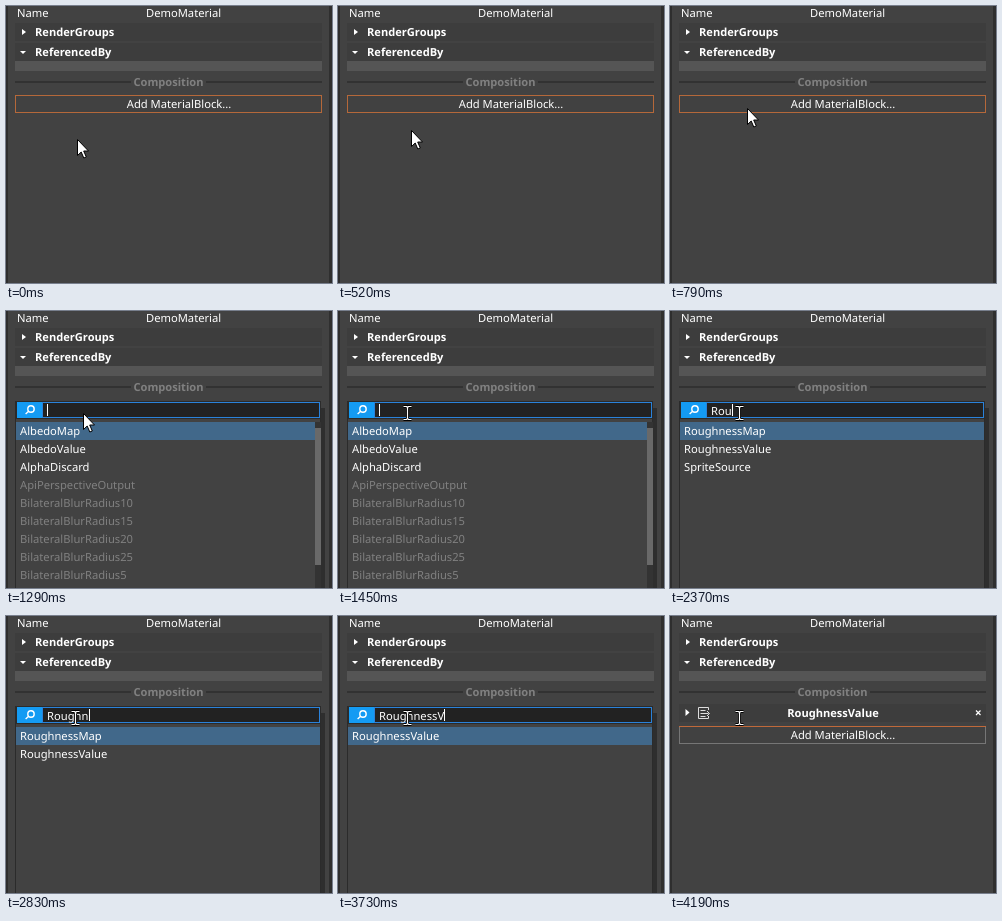
An HTML page for the animation above (5.28 s loop, 326x277 px).

```html
<!DOCTYPE html>
<html lang="en">
<head>
<meta charset="utf-8">
<title>Material block picker</title>
<style>
html, body { margin: 0; width: 100%; height: 100%; overflow: hidden; background: #424242; }
svg { display: block; width: 326px; height: 277px; }
text { font: 11.2px "Noto Sans", "Open Sans", sans-serif; fill: #fff; text-rendering: geometricPrecision; white-space: pre; }
.bold { font-weight: 700; font-size: 11.1px; }
.mid { text-anchor: middle; }
.dim { fill: #808080; }
.head { fill: #3d3d3d; }
.line { fill: #323232; }
</style>
</head>
<body>
<svg viewBox="0 0 326 277">
  <rect width="326" height="277" fill="#424242"/>
  <rect width="2" height="277" fill="#2e2e2e"/>
  <rect x="323" width="3" height="277" fill="#2f2f2f"/>

  <text x="11" y="11">Name</text>
  <text x="140" y="11">DemoMaterial</text>
  <rect class="head" x="9" y="17" width="307" height="18"/>
  <path d="M16 23l4 3-4 3z" fill="#fff"/>
  <text class="bold" x="29" y="30">RenderGroups</text>
  <rect class="head" x="9" y="37" width="307" height="18"/>
  <path d="M14 45h6l-3 3z" fill="#fff"/>
  <text class="bold" x="29" y="50">ReferencedBy</text>
  <rect x="9" y="55" width="307" height="10" fill="#555"/>
  <rect class="line" x="9" y="75" width="116" height="2"/>
  <rect class="line" x="200" y="75" width="116" height="2"/>
  <text class="bold mid dim" x="162.5" y="80">Composition</text>

  <g id="before">
    <rect x="9.5" y="89.5" width="306" height="17" fill="#414141" stroke="#b5683a"/>
    <text class="mid" x="173" y="102">Add MaterialBlock...</text>
  </g>

  <g id="popup">
    <rect x="315" y="97" width="4" height="180" fill="#000" opacity=".3"/>
    <rect x="9" y="90" width="306" height="187" fill="#2b2b2b"/>
    <rect x="10" y="108" width="304" height="169" fill="#424242"/>
    <rect x="36.5" y="91.5" width="277" height="15" fill="#222" stroke="#2a82da"/>
    <rect x="11" y="91" width="25" height="16" fill="#149bf3"/>
    <g fill="none" stroke="#fff" stroke-width="1.4">
      <circle cx="25" cy="98" r="3.2"/>
      <path d="M22.6 100.3L19.6 103"/>
    </g>
    <text id="query" x="41" y="104"></text>
    <rect id="caret" y="93" width="1" height="12" fill="#fff"/>
    <rect id="pick" x="10" y="111" height="18" fill="#41688a"/>
    <g id="rows"></g>
    <g id="bar">
      <rect x="309" y="111" width="6" height="166" fill="#333"/>
      <rect id="thumb" x="309" y="117" width="6" fill="#696969"/>
    </g>
  </g>

  <g id="after">
    <rect class="head" x="9" y="88" width="307" height="18"/>
    <path d="M15.5 93l4 3.5-4 3.5z" fill="#fff"/>
    <g fill="none" stroke="#ddd">
      <path d="M38.5 94V91.500H28.500V102.500H38.500V100"/>
      <path d="M30.500 94.500h5M30.500 97.500h8M30.500 100.500h5M37 95l2.500 2.500-2.500 2.500"/>
    </g>
    <text class="bold mid" x="163" y="101">RoughnessValue</text>
    <path d="M306 94.500l4.500 4.500M310.500 94.500l-4.500 4.500" stroke="#fff" stroke-width="1.200"/>
    <rect x="9.500" y="110.500" width="306" height="17" fill="#414141" stroke="#767676"/>
    <rect x="9" y="110" width="307" height="1" fill="#c0693a"/>
    <text class="mid" x="173" y="123">Add MaterialBlock...</text>
  </g>

  <path id="arrow" d="M.5 .5V16.500L4.200 13 6.800 19 9.300 18 6.700 12H11.500z" fill="#fff" stroke="#000"/>
  <g id="beam" fill="none">
    <path id="stem" d="M-4-6.500H-1L0-5.500 1-6.500H4M0-5.500V5.500M-4 6.500H-1L0 5.500 1 6.500H4" stroke="#000" stroke-width="3"/>
    <use href="#stem" style="display:none"/>
    <path d="M-4-6.500H-1L0-5.500 1-6.500H4M0-5.500V5.500M-4 6.500H-1L0 5.500 1 6.500H4" stroke="#fff" stroke-width="1.200"/>
  </g>
</svg>
<script>
const LOOP = 5280, OPEN = 1290, CLOSE = 4190;
const $ = id => document.getElementById(id);
const show = (id, on) => $(id).setAttribute('visibility', on ? 'inherit' : 'hidden');
const place = (id, x, y) => $(id).setAttribute('transform', `translate(${x} ${y})`);

// A leading "-" marks a disabled entry.
const base = 'RoughnessMap RoughnessValue';
const lists = {
  all: 'AlbedoMap AlbedoValue AlphaDiscard -ApiPerspectiveOutput -BilateralBlurRadius10 -BilateralBlurRadius15 -BilateralBlurRadius20 -BilateralBlurRadius25 -BilateralBlurRadius5',
  r: base + ' NormalMap -ForwardPass -StreamedVertex SpriteSourceColor -ForwardPassShadows DirectionalLightFragment ColorMap',
  ro: base + ' SpriteSource SpriteSourceColor -ForwardPassShadows DirectionalLightFragment',
  rou: base + ' SpriteSource',
  rough: base,
  value: 'RoughnessValue'
};

// time, typed length, list, caret x, scrollbar thumb height
const typing = [
  [OPEN, 0, 'all', 41, 137], [2040, 1, 'r', 48, 160], [2240, 2, 'ro', 55, 0],
  [2370, 3, 'rou', 62, 0], [2570, 4, 'rough', 69, 0], [2700, 5, 'rough', 76, 0],
  [2830, 6, 'rough', 83, 0], [2960, 7, 'rough', 89, 0], [3030, 8, 'rough', 94, 0],
  [3200, 9, 'rough', 99, 0], [3730, 10, 'value', 106, 0]
];

let current;
function setPopup(state) {
  if (state === current) return;
  current = state;
  const [, count, list, caret, thumb] = state;
  $('query').textContent = 'RoughnessV'.slice(0, count);
  $('caret').setAttribute('x', caret);
  $('pick').setAttribute('width', thumb ? 299 : 304);
  $('thumb').setAttribute('height', thumb);
  show('bar', thumb);
  $('rows').innerHTML = lists[list].split(' ').map((name, i) =>
    `<text x="14" y="${124 + 18 * i}"${name[0] === '-' ? ' class="dim"' : ''}>${name.replace('-', '')}</text>`
  ).join('');
}

function moveCursor(t) {
  const beam = t >= 1390;
  show('arrow', !beam);
  show('beam', beam);
  if (beam) {
    const step = Math.min(3, 1 + Math.floor((t - 1390) / 30));
    place('beam', 77 - 2.5 * step, 102);
  } else {
    const k = t < 360 ? 0 : Math.min(1, (1 + Math.floor((t - 360) / 33)) / 14);
    const e = k * k * (3 - 2 * k);
    place('arrow', Math.round(71 + 6 * e), Math.round(133 - 31 * e));
  }
}

function draw(t) {
  const open = t >= OPEN && t < CLOSE;
  show('before', t < OPEN);
  show('popup', open);
  show('after', t >= CLOSE);
  if (open) setPopup(typing.findLast(s => t >= s[0]));
  moveCursor(t);
}

const start = performance.now();
function tick() {
  draw((performance.now() - start) % LOOP);
  requestAnimationFrame(tick);
}
tick();
</script>
</body>
</html>
```
